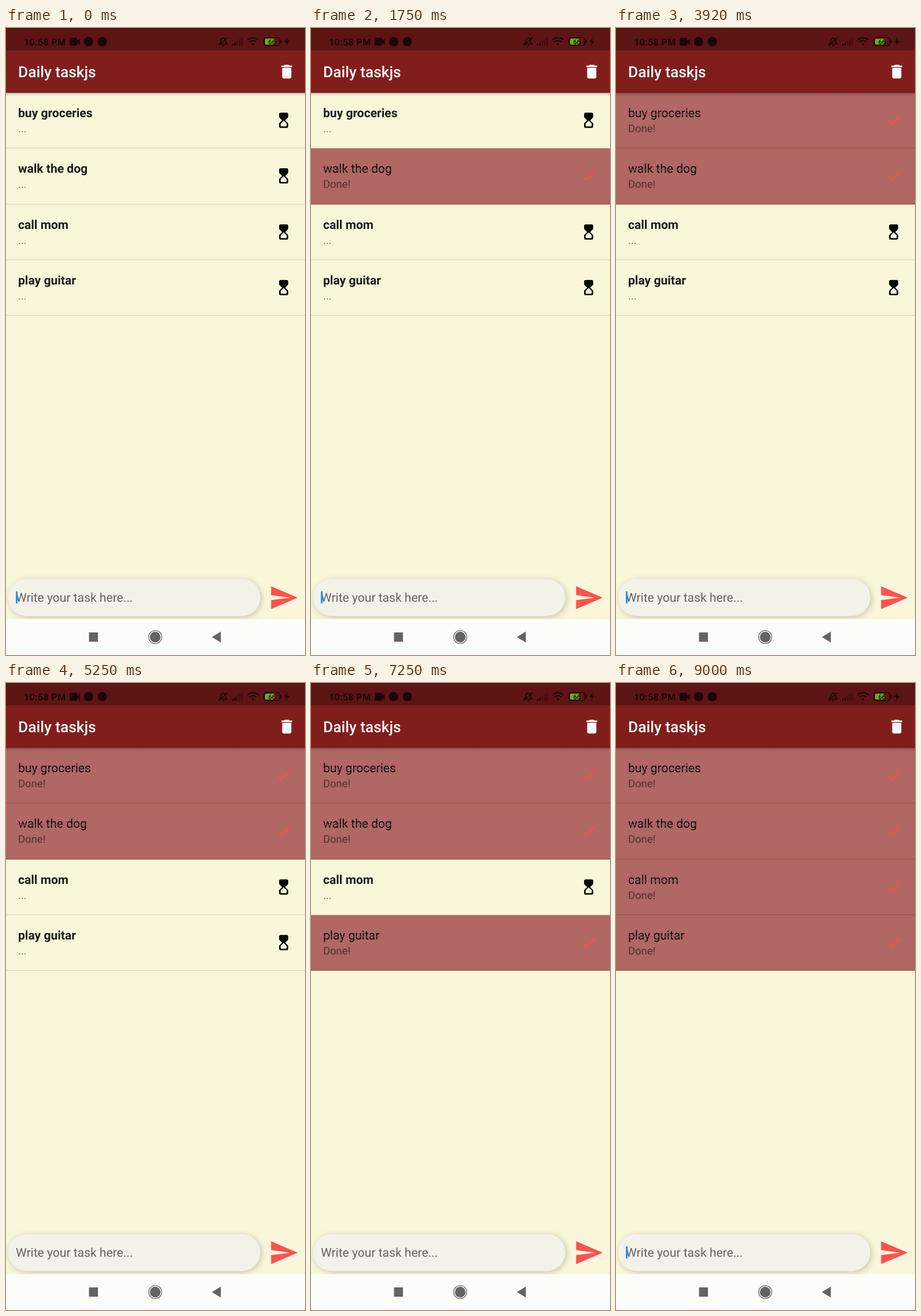
Write an HTML page that moves like this. It is 517 px wide and 1083 px high and loops after 9.08 s.

```html
<!DOCTYPE html>
<html lang="en">
<head>
<meta charset="utf-8">
<title>Daily tasks</title>
<style>
  html, body { margin: 0; height: 100%; overflow: hidden; background: #f9f6da; }
  svg { display: block; font-family: Roboto, sans-serif; text-rendering: geometricPrecision; }
  .title { font-size: 21.05px; font-weight: 700; fill: #1d1c19; }
  .sub { font-size: 18.42px; fill: rgba(0, 0, 0, .54); }
  .done .title { font-weight: 400; fill: #0e0808; }
  .strike, .check, .done .glass { display: none; }
  .done .strike, .done .check { display: inline; }
  .bg { fill: none; }
  .done .bg { fill: #b16763; }
  .check { fill: #f3524f; }
</style>
</head>
<body>
<svg id="stage" width="100%" height="100%" viewBox="0 0 517 1083" preserveAspectRatio="none">
  <defs>
    <linearGradient id="shade" x2="0" y2="1">
      <stop stop-opacity=".28"/><stop offset=".4" stop-opacity=".1"/><stop offset="1" stop-opacity="0"/>
    </linearGradient>
    <filter id="soft" x="-10%" y="-40%" width="120%" height="180%">
      <feDropShadow dx="2" dy="2" stdDeviation="5.5" flood-opacity=".22"/>
    </filter>
  </defs>
  <rect width="517" height="1083" fill="#f9f6da"/>
  <g id="list"></g>

  <!-- header -->
  <rect y="112" width="517" height="6" fill="url(#shade)"/>
  <rect width="517" height="112" fill="#811e1b"/>
  <rect width="517" height="38.5" fill="#5d1415"/>
  <text x="21" y="85" font-size="26.3" font-weight="500" fill="#fff">Daily taskjs</text>
  <path transform="translate(469.7 59.5) scale(1.316)" fill="#fff"
    d="M6 19c0 1.1.9 2 2 2h8c1.1 0 2-.9 2-2V7H6zM19 4h-3.5l-1-1h-5l-1 1H5v2h14z"/>

  <!-- status bar -->
  <g fill="#1c0506">
    <text x="31" y="29.5" font-size="16.3" font-weight="700" letter-spacing=".2">10:58 PM</text>
    <path d="M112 17h9q2 0 2 2v3l4.5-4v11.5l-4.5-4v3q0 2-2 2h-9q-2 0-2-2v-9.5q0-2 2-2z"/>
    <circle cx="142.8" cy="23.5" r="8"/>
    <circle cx="166.5" cy="23.5" r="8"/>
    <path d="M391 27h2.5v3.5h-2.5zM395 25h2.5v5.5h-2.5z"/>
    <path opacity=".4" d="M399 22h2.5v8.5h-2.5zM403 19h2.5v11.5h-2.5zM407 16h2.5v14.5h-2.5z"/>
    <path d="M424.500 27.500q2.500-2 5 0l-2.500 3z"/>
    <path d="M487 16l-5.500 8.500h4l-1.500 6.500 6-9h-4.200z"/>
    <rect x="474.800" y="20.500" width="2" height="6" rx="1"/>
  </g>
  <g fill="none" stroke="#1c0506" stroke-width="1.6">
    <path d="M369 27.500q2.500-1.500 2.500-5 0-5 4-5t4 5q0 3.500 2.500 5zM373.500 30.500h4M368 30.500l15-14"/>
    <path d="M417.500 20.500q9.500-7.500 19 0M420.800 24.200q6.200-5 12.400 0" stroke-width="2"/>
    <rect x="446" y="16.500" width="27.500" height="14" rx="4"/>
  </g>
  <rect x="448" y="18.500" width="16" height="10" rx="2" fill="#65b320"/>
  <text x="459.800" y="27.500" font-size="11" font-weight="500" text-anchor="middle" fill="#1c0506">66</text>

  <!-- input -->
  <rect x="4" y="952" width="435.500" height="63.500" rx="31.750" fill="#f3f2ea" filter="url(#soft)"/>
  <text x="17" y="991" font-size="21.05" fill="#65645f">Write your task here...</text>
  <rect id="cursor" x="17" y="973" width="3" height="21" fill="#2196f3"/>
  <path transform="translate(454 957.600) scale(2.193)" fill="#fd5250"
    d="M2 21L23 12 2 3v7l15 2-15 2z"/>

  <!-- navigation -->
  <rect y="1021" width="517" height="62" fill="#fcfdfa"/>
  <g fill="#636363">
    <rect x="143.500" y="1044" width="15.500" height="16"/>
    <circle cx="258" cy="1052" r="9.200"/>
    <circle cx="258" cy="1052" r="11.300" fill="none" stroke="#636363" stroke-width="1.300"/>
    <path d="M356 1052l15.500-9.500v19z"/>
  </g>
</svg>
<script>
const LOOP = 9080, HOLD = 190, FADE = 200;
const rowTop = i => 112 + Math.round(96.25 * i);

// width: struck-through text; tap: touch start; x, y: touch point inside the row
const tasks = [
  { name: 'buy groceries', width: 125, tap: 3485, x: 63, y: 50 },
  { name: 'walk the dog', width: 119, tap: 1150, x: 75, y: 46 },
  { name: 'call mom', width: 87, tap: 8100, x: 80, y: 46 },
  { name: 'play guitar', width: 98, tap: 5998, x: 94, y: 40 }
];

const GLASS = 'M8 2c-1.1 0-2 .9-2 2v3.17c0 .53.21 1.04.59 1.41L10 12l-3.42 3.42c-.37.38-.58.89-.58 1.42V20' +
  'c0 1.1.9 2 2 2h8c1.1 0 2-.9 2-2v-3.16c0-.53-.21-1.04-.58-1.41L14 12l3.41-3.4c.38-.38.59-.89.59-1.42V4' +
  'c0-1.1-.9-2-2-2zm8 14.5V19c0 .55-.45 1-1 1H9c-.55 0-1-.45-1-1v-2.5l4-4z';
const CHECK = 'M9 16.2L4.8 12l-1.4 1.4L9 19 21 7l-1.4-1.4z';

const list = document.getElementById('list');
const cursor = document.getElementById('cursor');

list.innerHTML = tasks.map((task, i) => {
  const top = rowTop(i), height = rowTop(i + 1) - top;
  return `
  <svg y="${top}" width="517" height="${height}">
    <rect class="bg" width="517" height="${height}"/>
    <rect class="press" width="517" height="${height}" fill="#bcbcbc"/>
    <circle class="ripple" cx="${task.x}" cy="${task.y}" fill="#c5c4bc"/>
    <rect y="${height - 1.3}" width="517" height="1.3" fill-opacity=".12"/>
    <text class="title" x="21" y="42.1">${task.name}</text>
    <rect class="strike" x="21" y="36.6" width="${task.width}" height="1.1" fill="#85605c"/>
    <text class="sub" x="21" y="68.4"></text>
    <g transform="translate(464.3 31.6) scale(1.316)">
      <path class="glass" d="${GLASS}"/><path class="check" d="${CHECK}"/>
    </g>
  </svg>`;
}).join('');

tasks.forEach((task, i) => {
  const row = list.children[i];
  task.row = row;
  for (const part of ['press', 'ripple', 'sub']) task[part] = row.querySelector('.' + part);
});

const clamp = v => Math.max(0, Math.min(1, v));

function drawTask(task, t) {
  const age = t - task.tap, after = age - HOLD;
  const done = after >= 0;
  const fade = age < 0 ? 0 : 1 - clamp(after / FADE);
  const grow = done ? HOLD / 1000 + after / 390 : age / 1000;
  task.row.setAttribute('class', done ? 'done' : '');
  task.sub.textContent = done ? 'Done!' : '...';
  task.press.setAttribute('opacity', .4 * clamp(age / FADE) * fade);
  task.ripple.setAttribute('opacity', .4 * fade);
  task.ripple.setAttribute('r', (517 - task.x) * clamp(grow));
}

function frame(now) {
  const t = now % LOOP;
  tasks.forEach(task => drawTask(task, t));
  cursor.setAttribute('opacity', (t + 250) % 1000 < 500 ? 1 : 0);
  requestAnimationFrame(frame);
}
frame(0);
</script>
</body>
</html>
```
